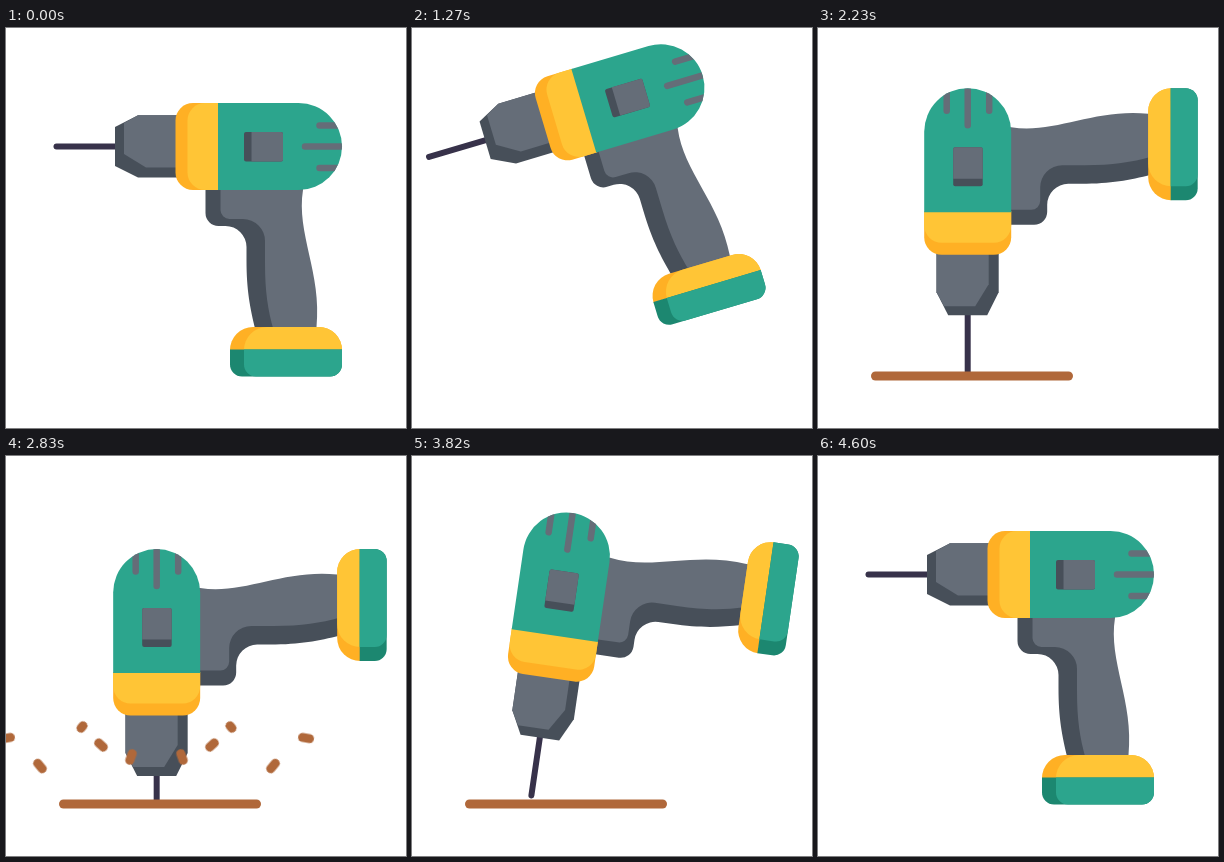
Recreate the animation shown at these times as an HTML page without scripts. Size 400x400 px, loop 4630 ms.

```html
<!DOCTYPE html>
<html lang="en">
<head>
<meta charset="utf-8">
<title>Cordless drill</title>
<style>
  html, body { margin: 0; width: 100%; height: 100%; overflow: hidden; background: #fff; }
  svg { display: block; width: 100%; height: 100%; }

  .green { fill: #2ca58d; }
  .green-dark { fill: #1c8770; }
  .yellow { fill: #ffc536; }
  .orange { fill: #ffb024; }
  .grey { fill: #656d78; }
  .grey-dark { fill: #474f59; }

  .drill, .plank, .chip { animation: 4630ms linear infinite both; }
  .drill { transform-origin: 192px 211.5px; animation-name: travel, turn; }
  .plank { transform-origin: 154px 348px; animation-name: plank; }
  .chip { stroke: #b0683a; stroke-width: 9; stroke-linecap: round; animation-name: fly; }

  /* resting places of each chip, mid-flight and late */
  .a { --mid: translate(176px, 301px) rotate(70deg); --late: translate(181px, 294px) rotate(60deg); }
  .b { --mid: translate(206px, 289px) rotate(-43deg); --late: translate(209.5px, 287px) rotate(-55deg); }
  .c { --mid: translate(225px, 271px) rotate(-50deg); --late: translate(227px, 271px) rotate(35deg); }
  .c { --mid: translate(225px, 271px) rotate(50deg); }
  .d { --mid: translate(267px, 310px) rotate(-50deg); --late: translate(276.5px, 313px) rotate(-86deg); }
  .e { --mid: translate(300px, 282px) rotate(10deg); --late: translate(315px, 300px) rotate(-25deg); --size: .77; }

  @keyframes travel {
    0% { translate: 0 0; }
    21.6% { translate: 0 0; animation-timing-function: ease-in-out; }
    28.08% { translate: -13px -34.5px; }
    30.02% { translate: -11px -32.5px; }
    33.26% { translate: 10px -19.5px; }
    37.15% { translate: 33px -14px; }
    41.04% { translate: 47px -11.5px; }
    44.92% { translate: 51px -11px; }
    48.16% { translate: 50.7px -7.2px; animation-timing-function: cubic-bezier(.33, 0, .67, 1); }
    70.84% { translate: 52.3px 46.8px; }
    73.43% { translate: 52.3px 46.8px; animation-timing-function: cubic-bezier(.4, 0, .8, .7); }
    79.91% { translate: 51.5px 14.5px; }
    82.51% { translate: 40px 1.5px; }
    84.45% { translate: 27px -12px; }
    86.39% { translate: 10px -23.5px; }
    88.34% { translate: -6px -32px; }
    89.63% { translate: -13px -34.5px; animation-timing-function: ease-in-out; }
    99.35%, 100% { translate: 0 0; }
  }
  @keyframes turn {
    0% { rotate: 0deg; }
    21.6% { rotate: 0deg; animation-timing-function: ease-in-out; }
    41.25% { rotate: -90deg; }
    78.88% { rotate: -90deg; animation-timing-function: ease-in-out; }
    96.05%, 100% { rotate: 0deg; }
  }
  @keyframes plank {
    0% { transform: scaleX(0); }
    36.5% { transform: scaleX(0); animation-timing-function: ease-in-out; }
    43.6% { transform: scaleX(1); }
    84.5% { transform: scaleX(1); animation-timing-function: ease-in-out; }
    91%, 100% { transform: scaleX(0); }
  }
  @keyframes fly {
    0% { transform: translate(150.5px, 340px) rotate(0deg) scale(0); }
    50.1% { transform: translate(150.5px, 340px) rotate(0deg) scale(0); animation-timing-function: ease-out; }
    61.12% { transform: var(--mid) scale(1); }
    69.55% { transform: var(--late) scale(var(--size, 1)); animation-timing-function: ease-in; }
    75%, 100% { transform: var(--late) scale(0); }
  }
</style>
</head>
<body>
<svg viewBox="0 0 400 400">
  <defs>
    <clipPath id="above"><path d="M-50-50H450V349H-50z"/></clipPath>
    <clipPath id="shell"><path d="M200 75H292.5a43.5 43.5 0 0 1 0 87H200z"/></clipPath>
  </defs>

  <g clip-path="url(#above)">
    <g class="drill">
      <path d="M50.5 118.5H115" stroke="#37324a" stroke-width="6" stroke-linecap="round"/>

      <!-- chuck -->
      <path class="grey-dark" d="M172 87.3H132L109 99V138L132 149.5H172z"/>
      <path class="grey" d="M172 87.3H132L118 95V126L140 139.5H172z"/>

      <!-- handle -->
      <path class="grey-dark" d="M199.5 158V185a13 13 0 0 0 13 13H219.5a21 21 0 0 1 21 21V232C240.5 262 244 280 249.5 302H290V158z"/>
      <path class="grey" d="M214.5 158V182a9 9 0 0 0 9 9H237a22 22 0 0 1 22 22V235C259 264 262 282 267.5 302H310.5V299C316 245 290 205 297 162V158z"/>

      <!-- body -->
      <path class="orange" d="M213 75H187a17.5 17.5 0 0 0-17.5 17.5v52a17.5 17.5 0 0 0 17.5 17.5H213z"/>
      <path class="yellow" d="M213 75H199a17.5 17.5 0 0 0-17.5 17.5v52a17.5 17.5 0 0 0 17.5 17.5H213z"/>
      <path class="green" d="M212 75H292.5a43.5 43.5 0 0 1 0 87H212z"/>
      <path clip-path="url(#shell)" d="M313.5 97.5H340M299 118.5H340M313.5 140H340" stroke="#656d78" stroke-width="6.5" stroke-linecap="round"/>
      <rect class="grey-dark" x="238" y="104" width="39" height="29.5" rx="2"/>
      <path class="grey" d="M245.5 104H275a2 2 0 0 1 2 2V131.5a2 2 0 0 1-2 2H245.5z"/>

      <!-- battery -->
      <path class="orange" d="M224 322a23 23 0 0 1 23-23H313a23 23 0 0 1 23 23z"/>
      <path class="yellow" d="M238 322a23 23 0 0 1 23-23H313a23 23 0 0 1 23 23z"/>
      <path class="green-dark" d="M224 321.5H336V336.5a12 12 0 0 1-12 12H236a12 12 0 0 1-12-12z"/>
      <path class="green" d="M238 321.5H336V336.5a12 12 0 0 1-12 12H250a12 12 0 0 1-12-12z"/>
    </g>
  </g>

  <rect class="plank" x="53" y="343.5" width="202" height="9" rx="4.5" fill="#b0683a"/>

  <g>
    <path class="chip a" d="M-3.5 0h7"/>
    <path class="chip b" d="M-3 0h6"/>
    <path class="chip c" d="M-1.5 0h3"/>
    <path class="chip d" d="M-3.5 0h7"/>
    <path class="chip e" d="M-3.5 0h7"/>
  </g>
  <g transform="translate(301) scale(-1 1)">
    <path class="chip a" d="M-3.5 0h7"/>
    <path class="chip b" d="M-3 0h6"/>
    <path class="chip c" d="M-1.5 0h3"/>
    <path class="chip d" d="M-3.5 0h7"/>
    <path class="chip e" d="M-3.5 0h7"/>
  </g>
</svg>
</body>
</html>
```
